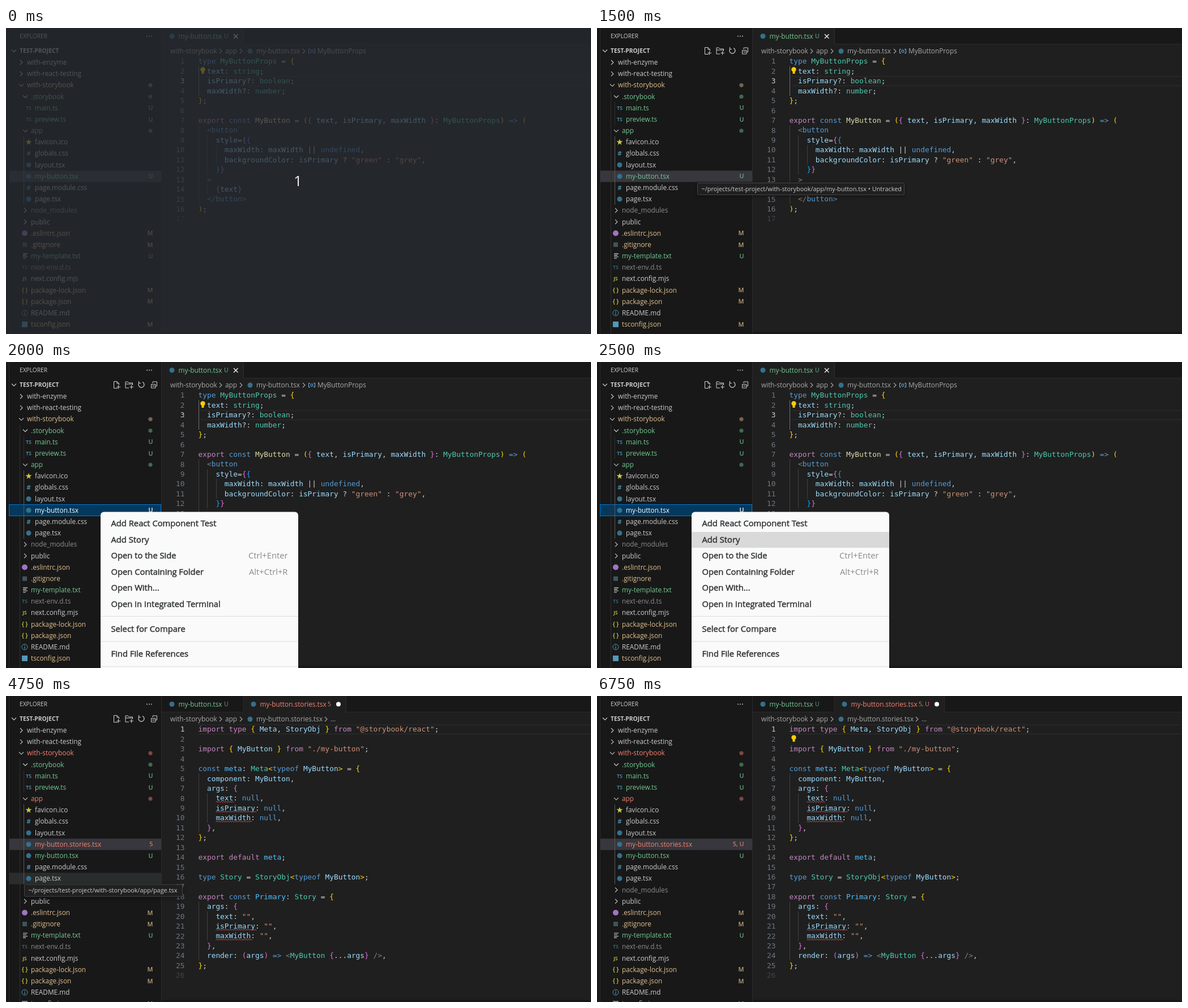
Recreate the animation shown at these times as an HTML page. Size 1033 by 542 pixels, loop 7000 ms.

```html
<!DOCTYPE html>
<html lang="en">
<head>
<meta charset="utf-8">
<title>Add a story from the explorer</title>
<style>
  html, body { margin: 0; width: 100%; height: 100%; overflow: hidden; background: #1f1f1f; }
  svg { display: block; width: 1033px; height: 542px; }
  text { font-family: "Open Sans", "Noto Sans", sans-serif; white-space: pre; }
  .code { font-family: "DejaVu Sans Mono", monospace; }
  .medium { stroke: #333638; stroke-width: .5px; }
</style>
</head>
<body>
<svg id="stage" viewBox="0 0 1033 542"></svg>
<script>
const LOOP = 7000;
const STEPS = [0, 250, 1000, 1500, 1750, 2000, 2500, 4000, 4250, 4500, 4750,
  5000, 5250, 5500, 5750, 6000, 6250, 6750];

const ROW = 20.17, LINE = 17.43, CHAR = 7.724, CODE_X = 339.5;
const rowY = i => 61 + ROW * i;
const lineY = i => 59 + LINE * i;

const GREEN = '#73c991', AMBER = '#e2c08d', RED = '#f88070', DIM = '#8c8c8c', PLAIN = '#cccccc';
const BLUE = '#519aba', YELLOW = '#cbcb41', REACT = '#35708c';

// Code colours, switched inside a line by "~" and a letter
const INK = {
  w: '#cccccc', k: '#569cd6', p: '#c586c0', t: '#4ec9b0', v: '#9cdcfe', c: '#4fc1ff', f: '#dcdcaa',
  s: '#ce9178', g: '#808080', y: '#ffd700', o: '#da70d6', b: '#179fff', a: '#ffd700'
};

const BUTTON_CODE = `~ktype ~tMyButtonProps~w = ~y{
  ~vtext~w: ~tstring~w;
  ~visPrimary~w?: ~tboolean~w;
  ~vmaxWidth~w?: ~tnumber~w;
~y}~w;

~pexport ~kconst ~fMyButton~w = ~y(~o{~v text~w, ~visPrimary~w, ~vmaxWidth ~o}~w: ~tMyButtonProps~y) ~k=> ~y(
  ~g<~kbutton
    ~vstyle~w=~o{~b{
      ~vmaxWidth~w: ~vmaxWidth~w || ~kundefined~w,
      ~vbackgroundColor~w: ~visPrimary~w ? ~s"green"~w : ~s"grey"~w,
    ~b}~o}
  ~g>
    ~o{~vtext~o}
  ~g</~kbutton~g>
~y)~w;
`.split('\n');

const STORY_CODE = `~pimport type ~y{ ~vMeta~w, ~vStoryObj ~y} ~pfrom ~s"@storybook/react"~w;

~pimport ~y{ ~vMyButton ~y} ~pfrom ~s"./my-button"~w;

~kconst ~cmeta~w: ~tMeta~a<~ktypeof ~vMyButton~a>~w = ~y{
  ~vcomponent~w: ~vMyButton~w,
  ~vargs~w: ~o{
    ~vtext~w: ~knull~w,
    ~visPrimary~w: ~knull~w,
    ~vmaxWidth~w: ~knull~w,
  ~o}~w,
~y}~w;

~pexport default ~cmeta~w;

~ktype ~tStory~w = ~tStoryObj~a<~ktypeof ~vMyButton~a>~w;

~pexport ~kconst ~cPrimary~w: ~tStory~w = ~y{
  ~vargs~w: ~o{
    ~vtext~w: ~s""~w,
    ~visPrimary~w: ~s""~w,
    ~vmaxWidth~w: ~s""~w,
  ~o}~w,
  ~vrender~w: ~o(~vargs~o) ~k=> ~g<~tMyButton ~o{~w...~vargs~o} ~g/>~w,
~y}~w;
`.split('\n');

// Level, icon, name, colour, status
const FILES = [
  [0, '>', 'with-enzyme'], [0, '>', 'with-react-testing'], [0, 'v', 'with-storybook', AMBER, 'dot'],
  [1, 'v', '.storybook', GREEN, 'dot'], [2, 'TS', 'main.ts', GREEN, 'U'], [2, 'TS', 'preview.ts', GREEN, 'U'],
  [1, 'v', 'app', GREEN, 'dot'], [2, 'star', 'favicon.ico'], [2, '#', 'globals.css'],
  [2, 'react', 'layout.tsx'], [2, 'react', 'my-button.tsx', GREEN, 'U'], [2, '#', 'page.module.css'],
  [2, 'react', 'page.tsx'], [1, '>', 'node_modules', DIM], [1, '>', 'public'],
  [1, 'lint', '.eslintrc.json', AMBER, 'M'], [1, 'git', '.gitignore', AMBER, 'M'],
  [1, 'lines', 'my-template.txt', GREEN, 'U'], [1, 'TS', 'next-env.d.ts', DIM], [1, 'JS', 'next.config.mjs'],
  [1, '{}', 'package-lock.json', AMBER, 'M'], [1, '{}', 'package.json', AMBER, 'M'],
  [1, 'info', 'README.md'], [1, 'square', 'tsconfig.json', AMBER, 'M']
];

const MENU = [
  ['Add React Component Test', 286], ['Add Story', 314.6], ['Open to the Side', 343, 'Ctrl+Enter'],
  ['Open Containing Folder', 371.5, 'Alt+Ctrl+R'], ['Open With...', 400],
  ['Open in Integrated Terminal', 428.5], ['Select for Compare', 472.5], ['Find File References', 516.5]
];

const esc = s => s.replace(/&/g, '&amp;').replace(/</g, '&lt;');
const rect = (x, y, w, h, fill, more = '') =>
  `<rect x="${x}" y="${y}" width="${w}" height="${h}" fill="${fill}" ${more}/>`;
const dot = (x, y, r, fill, more = '') => `<circle cx="${x}" cy="${y}" r="${r}" fill="${fill}" ${more}/>`;
const path = (d, stroke, w = 1, more = '') =>
  `<path d="${d}" fill="none" stroke="${stroke}" stroke-width="${w}" ${more}/>`;
// y is the middle of the text line
const label = (x, y, s, fill = PLAIN, size = 11.8, more = '') =>
  `<text x="${x}" y="${y + size * 0.35}" fill="${fill}" font-size="${size}" ${more}>${esc(s)}</text>`;
const chevron = (x, y, open, color = PLAIN) =>
  path(open ? `M${x - 4} ${y - 2}l4 4l4 -4` : `M${x - 2} ${y - 4}l4 4l-4 4`, color, 1.1);
const bulb = (x, y) => dot(x, y - 1.5, 4.2, '#ffcc00') + rect(x - 2, y + 2, 4, 4, '#ffcc00');

function icon(kind, x, y, faded) {
  switch (kind) {
    case 'react': return dot(x, y, 4.5, REACT);
    case 'lint': return dot(x, y, 5, '#a074c4');
    case 'git': return rect(x - 4, y - 4, 8, 8, '#41535b');
    case 'square': return rect(x - 5, y - 5, 10, 10, BLUE);
    case 'lines': return path(`M${x - 3} ${y - 4}h8m-8 2.7h6m-6 2.7h8m-8 2.7h5`, '#d4d7d6', 1.1);
    case 'info': return dot(x, y, 5, 'none', `stroke="${BLUE}"`) +
      path(`M${x} ${y - 3}v1.4m0 1.2v3.6`, BLUE, 1.3);
    case 'star': {
      let pts = '';
      for (let i = 0; i < 10; i++) {
        const r = i % 2 ? 2.3 : 5.8, a = i * Math.PI / 5;
        pts += `${x + r * Math.sin(a)},${y - r * Math.cos(a)} `;
      }
      return `<polygon points="${pts}" fill="${YELLOW}"/>`;
    }
  }
  const color = kind === 'JS' || kind === '{}' ? YELLOW : BLUE;
  const size = kind === '#' ? 11.5 : kind === '{}' ? 10.5 : 9;
  return label(x, y, kind === '{}' ? '{ }' : kind, color, size,
    `text-anchor="middle" font-weight="600" opacity="${faded ? 0.65 : 1}"`);
}

function files(s) {
  if (!s.story) return FILES;
  const list = FILES.map(f => f.slice());
  if (s.errors) list[2][3] = list[6][3] = RED;
  const status = s.untracked ? '5, U' : s.errors ? '5' : '';
  list.splice(10, 0, [2, 'react', 'my-button.stories.tsx', s.errors ? RED : PLAIN, status]);
  return list;
}

function actions() {
  const c = '#d0d0d0';
  return path('M197 46.5h-6.500v-12h5.500l3.500 3.500v2.500m-3.500 -6v3.500h3.500m-1 3v6.500m-3 -3.250h6.500', c) +
    path('M217 46h-6v-11h4l2 2h6.500v4m-12.500 -2h12.500m-2 2v6.500m-3 -3.250h6.500', c) +
    path('M235 37a5 5 0 1 0 6 -1.5m-6.5 -1.5v3.5h3.5', c, 1.2) +
    path('M256.500 39.500h7.500v6.500h-7.500zm2.500 -2v-2.500h7.500v7.500h-2.500m-6 0h4.500', c);
}

function sidebar(s) {
  const list = files(s), picked = 10;
  let out = rect(0, 0, 275, 542, '#181818') + rect(5, 0, 1, 542, '#2b2b2b') + rect(274, 0, 1, 542, '#2b2b2b');
  out += label(24, 14, 'EXPLORER', PLAIN, 10.2);
  for (const x of [249, 253, 257]) out += dot(x, 14.5, 0.9, PLAIN);
  out += chevron(14, 40.5, true) + label(24, 40.5, 'TEST-PROJECT', PLAIN, 10.3, 'font-weight="700"');
  if (s.inside) out += actions();

  if (s.hover >= 0) out += rect(6, rowY(s.hover) - ROW / 2, 268, ROW, '#2a2d2e');
  if (s.focus) out += rect(5.5, 252.5, 268, 20, '#04395e', 'stroke="#0078d4"');
  else out += rect(6, rowY(picked) - ROW / 2, 268, ROW, '#37373d');

  if (s.inside) out += rect(24, 111, 1, 431, '#303030') + rect(31, 131.5, 1, 40.5, '#303030');
  out += rect(31, 192, 1, ROW * (s.story ? 7 : 6), '#585858');

  list.forEach(([level, kind, name, color = PLAIN, status], i) => {
    const x = 37 + 7 * level, y = rowY(i), lit = s.focus && i === picked;
    const ink = lit ? '#ffffff' : color;
    out += kind === '>' || kind === 'v'
      ? chevron(x - 10, y, kind === 'v')
      : icon(kind, x - 11, y, color === DIM);
    out += label(x, y, name, ink);
    if (status === 'dot') out += dot(255, y, 3.6, color, 'opacity=".45"');
    else if (status) out += label(259.5, y, status, ink, 10.8,
      `text-anchor="end" font-weight="600" opacity="${lit ? 1 : 0.82}"`);
  });
  return out;
}

function tabs(s) {
  const tabEnd = !s.story ? 419 : s.untracked ? 613 : s.errors ? 600 : 587;
  const start = s.story ? 419 : 275;
  let out = rect(275, 0, 758, 29, '#181818') + rect(275, 28, 758, 1, '#2b2b2b');
  out += rect(start, 0, tabEnd - start, 29, '#1f1f1f');
  out += rect(418.5, 0, 1, 28, '#2b2b2b') + rect(tabEnd, 0, 1, 28, '#2b2b2b');
  out += icon('react', 293, 14.5) + label(304.5, 14.5, 'my-button.tsx', GREEN);
  out += label(385, 14.5, 'U', GREEN, 10.5, `opacity="${s.story ? 0.75 : 0.9}"`);
  if (!s.story) return out + path('M402 11l7.5 7.5m0 -7.5l-7.5 7.5', '#ffffff', 1.2);
  out += icon('react', 437, 14.5) + label(448.5, 14.5, 'my-button.stories.tsx', s.errors ? RED : '#ffffff');
  if (s.errors) out += label(568, 14.5, s.untracked ? '5, U' : '5', RED, 10.5, 'opacity=".9"');
  return out + dot(tabEnd - 13, 14.5, 4, '#ffffff');
}

function crumbs(s) {
  const c = '#a9a9a9';
  let out = label(290, 41, 'with-storybook', c) + chevron(379, 41, false, c) + label(387, 41, 'app', c) +
    chevron(415, 41, false, c) + icon('react', 431, 41);
  if (s.story) return out + label(442, 41, 'my-button.stories.tsx', c) + chevron(565, 41, false, c) +
    label(573, 41, '…', c);
  return out + label(442, 41, 'my-button.tsx', c) + chevron(526, 41, false, c) +
    path('M537 37.5h-2.5v7h2.5m6 -7h2.5v7h-2.5', '#75beff') +
    dot(540, 41, 2.2, 'none', 'stroke="#75beff"') + label(550, 41, 'MyButtonProps', c);
}

function codeLine(src, y, s) {
  const spans = src.trimStart().split('~').slice(1).map(part => {
    const color = part[0] === 'a' && !s.parsed ? INK.w : INK[part[0]];
    return `<tspan fill="${color}">${esc(part.slice(1))}</tspan>`;
  });
  const x = CODE_X + CHAR * (src.length - src.trimStart().length);
  return `<text class="code" x="${x}" y="${y + 4.4}" font-size="12.83">${spans.join('')}</text>`;
}

function squiggle(col, count, y) {
  let d = `M${CODE_X + col * CHAR} ${y + 7.5}`;
  for (let i = 0; i < count * CHAR / 4; i++) d += 'l2 -2l2 2';
  return path(d, '#f14c4c', 1);
}

function editor(s) {
  const lines = s.story ? STORY_CODE : BUTTON_CODE;
  const current = s.story ? 0 : 2;
  let out = rect(275, 0, 758, 542, '#1f1f1f') + tabs(s) + crumbs(s);
  const top = lineY(current) - 8.7;
  out += rect(340, top, 693, 1.5, '#2a2a2a') + rect(340, top + 16.2, 693, 1.5, '#2a2a2a');

  lines.forEach((src, i) => {
    const y = lineY(i), depth = (src.length - src.trimStart().length) / 2;
    for (let g = 0; g < depth; g++) {
      if (s.story && g && i < 12 && !s.parsed) continue;
      const active = !s.story && i < 4;
      out += rect(Math.round(340 + g * 2 * CHAR), y - LINE / 2, 1, LINE, active ? '#707070' : '#404040');
    }
    const ink = i === current ? PLAIN : i === lines.length - 1 ? '#404448' : '#6e7681';
    out += label(315.5, y, String(i + 1), ink, 12.83, 'class="code" text-anchor="end"');
    out += codeLine(src, y, s);
  });
  if (s.errors) for (const [line, count] of [[7, 4], [8, 9], [9, 8], [20, 9], [21, 8]])
    out += squiggle(4, count, lineY(line));
  if (s.bulb) out += bulb(347.5, 75);
  if (s.caret) out += rect(340, 50.5, 2, 17, '#aeafad');
  return out + rect(275, 538, 758, 4, '#181818');
}

const tooltip = (x, y, w, s) =>
  rect(x + 0.5, y + 0.5, w - 1, 21, '#202020',
    'stroke="#454545" rx="2" style="filter:drop-shadow(0 2px 3px rgba(0,0,0,.36))"') +
  label(x + 7.5, y + 11, s, PLAIN, 10.9);

function menu(s) {
  let out = rect(167, 265.5, 349, 300, '#fafafa', 'rx="6"');
  if (s.menuHover) out += rect(167, 301, 349, 28, '#d9d9d9');
  for (const y of [450, 494.5, 539]) out += rect(167, y, 349, 1, '#dedede');
  for (const [name, y, keys] of MENU) {
    out += label(185.5, y, name, '#333638', 14.75, 'class="medium"');
    if (keys) out += label(497.5, y, keys, '#868a8b', 14.75, 'text-anchor="end"');
  }
  return `<g opacity="${s.menuAlpha}">${out}</g>`;
}

function stateAt(t) {
  const within = (a, b) => t >= a && t < b;
  const story = t >= 4250;
  return {
    story,
    veil: t < 250,
    inside: within(1000, 6250),
    focus: within(1750, 4250),
    hover: within(4250, 6000) ? 13 : within(6000, 6250) ? 2 : -1,
    menuAlpha: within(1750, 2000) ? 0.2 : within(2000, 4000) ? 1 : 0,
    menuHover: t >= 2500,
    parsed: t >= 4500,
    errors: t >= 4750,
    untracked: t >= 5500,
    bulb: !story || t >= 5000,
    caret: story && Math.floor((t - 4250) / 500) % 2 === 0,
    buttonTip: within(1500, 1750),
    pageTip: within(4750, 6000)
  };
}

function draw(t) {
  const s = stateAt(t), root = '~/projects/test-project/with-storybook/app/';
  let out = editor(s) + sidebar(s);
  if (s.buttonTip) out += tooltip(177, 274, 366, root + 'my-button.tsx • Untracked');
  if (s.pageTip) out += tooltip(32, 333.5, 280, root + 'page.tsx');
  if (s.menuAlpha) out += menu(s);
  if (s.veil) out += rect(0, 0, 1033, 542, '#262a31', 'opacity=".74"') +
    label(515.5, 271, '1', '#eeeeee', 26, 'text-anchor="middle"');
  return out;
}

const stage = document.getElementById('stage');
const begin = performance.now();
let shown = -1;

function tick() {
  const t = Math.max(0, performance.now() - begin) % LOOP;
  const step = STEPS.filter(at => at <= t).length - 1;
  if (step !== shown) {
    shown = step;
    stage.innerHTML = draw(STEPS[step]);
  }
  requestAnimationFrame(tick);
}
tick();
</script>
</body>
</html>
```
